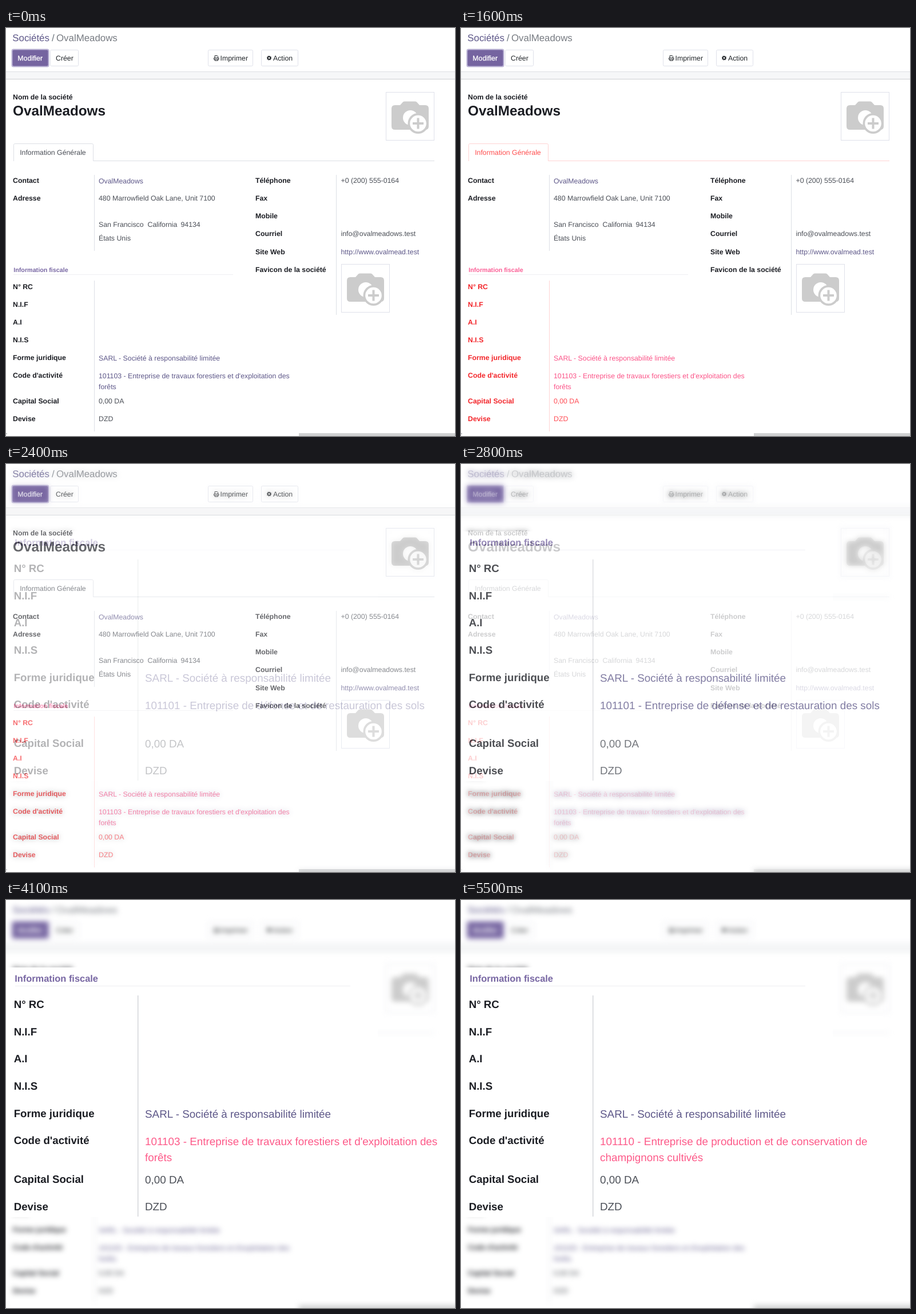
An HTML page that plays this animation: 785x714 px, repeating every 5700 ms.

```html
<!DOCTYPE html>
<html lang="fr">
<head>
<meta charset="utf-8">
<title>Fiche société</title>
<style>
html, body { margin: 0; width: 100%; height: 100%; overflow: hidden; background: #fff; }
svg { display: block; width: 100%; height: 100%; }
text { font-family: "Liberation Sans", Arial, sans-serif; text-rendering: geometricPrecision; white-space: pre; }
.lab { font-weight: 700; fill: #1b1d23; }
.val { fill: #4b4f57; }
.btn { fill: #212529; }
.link { fill: #5e5889; }
.head { font-weight: 700; fill: #7867a3; }
.rule { fill: none; stroke: #dcdfe5; }
.thin { fill: none; stroke: #efeff2; }
.box { fill: #fff; stroke: #dfe1ea; }
.tab.on .val { fill: #ff4f4f; }
.tab.on .rule { stroke: #ffd3d3; }
.fiscal.on .lab { fill: #f3262b; }
.fiscal.on .val { fill: #ff4f57; }
.fiscal.on .link { fill: #fb5488; }
.fiscal.on .head { fill: #fb5f96; }
.fiscal.on .rule { stroke: #ffd3d3; }
.hot text { fill: #fd5a89; }
.blur { filter: blur(5px); }
</style>
</head>
<body>
<svg id="stage" viewBox="0 0 785 714" preserveAspectRatio="none"></svg>
<script>
const LOOP = 5700;
const COMPANY = "OvalMeadows";

const text = (cls, x, y, str, size = 12.3) =>
  `<text class="${cls}" x="${x}" y="${y}" font-size="${size}">${str}</text>`;
const line = (cls, d) => `<path class="${cls}" d="${d}"/>`;
const column = (cls, x, rows, size) =>
  rows.map(([y, str]) => text(cls, x, y, str, size)).join("");
const button = (x, w) =>
  `<rect class="box" x="${x + .5}" y="38.5" width="${w}" height="28" rx="2"/>`;

const camera = (x, y) => `<g transform="translate(${x} ${y})">
  <rect class="box" x=".5" y=".5" width="84" height="84"/>
  <g fill="#ccc">
    <path d="M16 23H25L30 17.500Q31 16.500 33 16.500H51Q53 16.500 54 17.500L59 23H69Q75 23 75 29V60Q75 66 69 66H16Q10 66 10 60V29Q10 23 16 23Z"/>
    <circle cx="43" cy="45" r="13" fill="#fff"/>
    <circle cx="56.500" cy="55" r="18"/>
    <circle cx="56.500" cy="55" r="14.300" fill="#fff"/>
    <path d="M47 53H54.500V45.500H58.500V53H66V57H58.500V64.500H54.500V57H47Z"/>
  </g>
</g>`;

const printer = `<g fill="none" stroke="#212529">
  <path d="M365 52V48.500H369.500L370.500 49.500V52M365 54.500V57H370.500V54.500"/>
  <path d="M363.600 55V52.500H371.900V55H363.600"/></g>`;
const gear = `<g fill="none" stroke="#212529">
  <circle cx="460" cy="52.500" r="2.300" stroke-width="1.800"/>
  <circle cx="460" cy="52.500" r="3.500" stroke-width="1.200" stroke-dasharray="1.375 1.375"/></g>`;

function header() {
  return text("link", 11.3, 23, "Sociétés", 16.85) +
    `<text x="80" y="23" font-size="16.850" fill="#6c757d">/</text>` +
    `<text x="88" y="23" font-size="16.850" fill="#777b82">${COMPANY}</text>` +
    `<rect x="9.500" y="36.500" width="66" height="32" rx="3.500" fill="#bcb4d6"/>
     <rect x="11.500" y="38.500" width="62" height="28" rx="2" fill="#7564a0"/>
     <text x="20.300" y="56.500" font-size="12.300" fill="#fff" stroke="#fff" stroke-width=".3">Modifier</text>` +
    button(77, 49) + text("btn", 87, 56.5, "Créer") +
    button(353, 78) + printer + text("btn", 374.5, 56.5, "Imprimer") +
    button(446, 64) + gear + text("btn", 467, 56.5, "Action") +
    `<rect x="-40" y="77" width="865" height="12" fill="#f6f7f8"/>
     <rect x="-40" y="76" width="865" height="1" fill="#dee0e4"/>
     <rect x="-40" y="89" width="865" height="1" fill="#cdd0d3"/>`;
}

function page() {
  return header() +
    text("lab", 12, 125, "Nom de la société") +
    text("lab", 12, 153, COMPANY, 24.3) +
    camera(664, 112) +
    `<g class="tab">` +
      line("rule", "M13.500 233V204.500Q13.500 202.500 15.500 202.500H150.500Q152.500 202.500 152.500 204.500V232.500H749") +
      text("val", 24.2, 222, "Information Générale") + `</g>` +
    line("rule", "M154.500 257V390M577.500 257V502") +
    column("lab", 12, [[271, "Contact"], [302, "Adresse"]]) +
    text("link", 162, 272, COMPANY) +
    column("val", 162, [[302, "480 Marrowfield Oak Lane, Unit 7100"], [348, "San Francisco"], [372, "États Unis"]]) +
    text("val", 247.5, 348, "California") + text("val", 305.5, 348, "94134") +
    column("lab", 436, [[271, "Téléphone"], [302, "Fax"], [333, "Mobile"], [364, "Courriel"],
      [395.5, "Site Web"], [426.5, "Favicon de la société"]]) +
    column("val", 585.5, [[271, "+0 (200) 555-0164"], [364, "info@ovalmeadows.test"]]) +
    text("link", 585.5, 395.5, "http://www.ovalmead.test") +
    camera(586, 413) +
    `<g class="fiscal">` +
      text("head", 13.2, 426.5, "Information fiscale", 10.75) +
      line("thin", "M13 431.500H397") + line("rule", "M154.500 442V706") +
      column("lab", 12, [[456.5, "N° RC"], [487.5, "N.I.F"], [519, "A.I"], [550, "N.I.S"],
        [581, "Forme juridique"], [612, "Code d'activité"], [656.5, "Capital Social"], [687.5, "Devise"]]) +
      column("link", 162, [[582, "SARL - Société à responsabilité limitée"],
        [613, "101103 - Entreprise de travaux forestiers et d'exploitation des"], [632, "forêts"]]) +
      column("val", 162, [[656.5, "0,00 DA"], [687.5, "DZD"]]) + `</g>` +
    `<rect x="0" y="709" width="2" height="2" fill="#c4c6c8"/>
     <rect x="512" y="709" width="320" height="30" fill="#d0d1d2"/>`;
}

function panel() {
  return `<path d="M0 118H650V248H785V555H0Z" fill="#fff"/>` +
    text("head", 15.2, 143, "Information fiscale", 16.4) +
    line("thin", "M16 150.500H602") +
    `<path d="M230.700 167V554" stroke="#d3d5d9" stroke-width="1.500"/>` +
    column("lab", 13.7, [[188.5, "N° RC"], [236.5, "N.I.F"], [284, "A.I"], [332, "N.I.S"],
      [379.5, "Forme juridique"], [427.3, "Code d'activité"], [495.3, "Capital Social"], [543, "Devise"]], 18.65) +
    text("link", 243, 381.3, "SARL - Société à responsabilité limitée", 18.85) +
    column("val", 243, [[495.5, "0,00 DA"], [543, "DZD"]], 18.85) +
    `<g id="code">${column("link", 243, [[429, ""], [456.5, ""]], 18.85)}</g>`;
}

const stage = document.getElementById("stage");
stage.innerHTML = `<g id="form">${page()}</g>
  <g id="zoom"><rect width="785" height="714" fill="#fff"/><g class="blur">${page()}</g>${panel()}</g>`;

const form = document.getElementById("form");
const zoom = document.getElementById("zoom");
const code = document.getElementById("code");
const tab = form.querySelector(".tab");
const fiscal = form.querySelector(".fiscal");
const codeLines = code.querySelectorAll("text");

// Activities shown one after another, 200 ms each from 4100 on
const FIRST = ["Entreprise de défense et de restauration des sols"];
const NEXT = [
  ["Entreprise de travaux forestiers et d'exploitation des", "forêts"],
  ["Entreprise de mise en valeur des terres et des fermes"],
  ["Entreprise d'entretien et de plantation des palmeraies"],
  ["Entreprise de travaux de moisson et de battage", "mécanique"],
  ["Entreprise de travaux agricoles et traitement", "phytosanitaire"],
  ["Étude des sols cultivés"],
  ["Culture des arbres fruitiers"],
  ["Entreprise de production et de conservation de", "champignons cultivés"]
];

const within = (t, ...spans) => spans.some(([a, b]) => t >= a && t < b);
let shown = -2;

function setCode(i) {
  if (i === shown) return;
  shown = i;
  const [a, b = ""] = i < 0 ? FIRST : NEXT[i];
  codeLines[0].textContent = `${i < 0 ? 101101 : 101103 + i} - ${a}`;
  codeLines[1].textContent = b;
}

function draw(t) {
  tab.classList.toggle("on", within(t, [1000, 1200], [1400, 1800]));
  fiscal.classList.toggle("on", within(t, [1600, 1800], [2000, LOOP]));
  // Nine-step cross-fade to the enlarged section
  const step = Math.max(0, Math.min(9, Math.floor((t - 2100) / 100)));
  zoom.style.opacity = step / 9;
  zoom.style.visibility = step ? "visible" : "hidden";
  setCode(t < 4100 ? -1 : Math.min(NEXT.length - 1, Math.floor((t - 4100) / 200)));
  code.classList.toggle("hot", within(t, [3500, 3700], [3900, LOOP]));
}

const start = performance.now();
function tick() {
  draw((performance.now() - start) % LOOP);
  requestAnimationFrame(tick);
}
draw(0);
requestAnimationFrame(tick);
</script>
</body>
</html>
```
